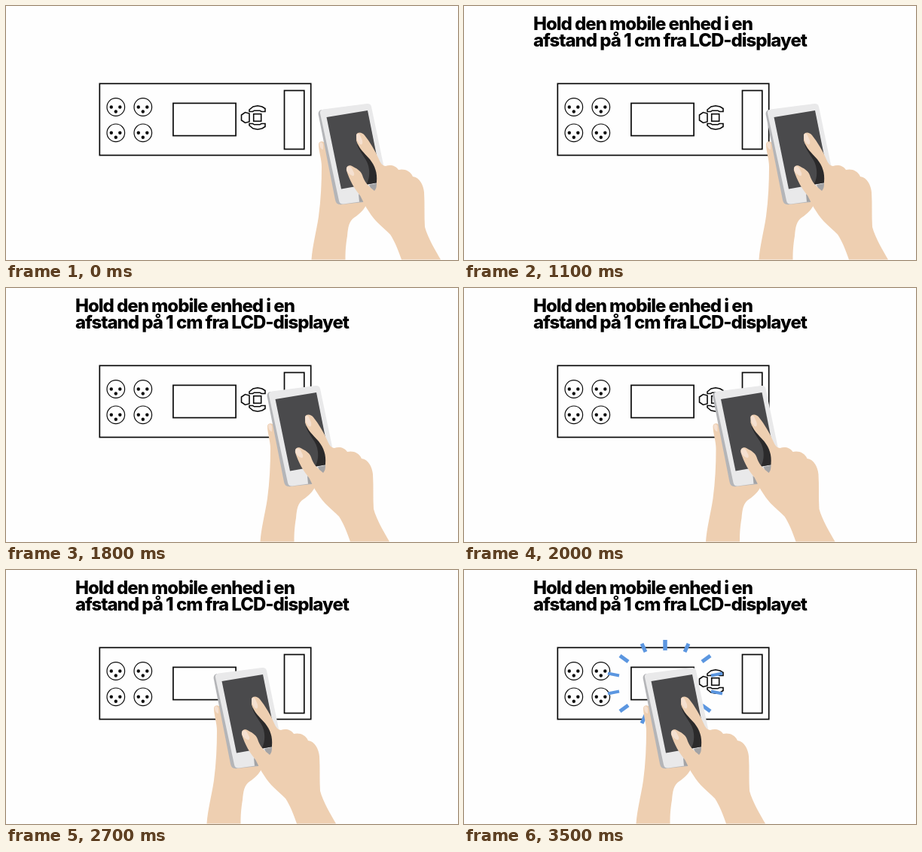
An HTML page with a canvas that plays this animation: 600x338 px, repeating every 3.6 s.

```html
<!DOCTYPE html>
<html lang="da">
<head>
<meta charset="utf-8">
<title>Hold den mobile enhed</title>
<style>
  html, body { margin: 0; width: 100%; height: 100%; overflow: hidden; background: #fefefe; }
  canvas { display: block; width: 600px; height: 338px; }
</style>
</head>
<body>
<canvas id="stage" width="600" height="338"></canvas>
<script>
const ctx = document.getElementById('stage').getContext('2d');
const LOOP = 3600, STEP = 100;
const SKIN = '#eecfb1', NAIL = '#f5e0d0', BLUE = '#5b96e0';

// Hand travel: [ms, x offset]
const travel = [
  [1000, 0], [1100, -14], [1500, -46], [1600, -51], [1800, -68], [2200, -101],
  [2300, -108], [2700, -139], [2800, -151], [3100, -177]
];

// One quadrant of the burst: outer x, y, inner x, y, width
const rays = [
  [0, 58, 0, 44, 5], [31, 53, 26, 42, 5], [60, 37, 49, 29, 5], [76, 13.5, 61, 10.5, 4]
];

const shape = {
  backHand: new Path2D('M415 184 C415 180 420 179 423 182 C427 187 429 197 431 206 L445 255 L480 261 C476 271 469 277 463 281 C455 286 454 295 453 306 C451 318 450.5 327 450.5 337.5 L405.5 337.5 C407 318 412 300 415 280 C418 257 419 235 419 214 C419 204 415 193 415 184Z'),
  backNail: new Path2D('M416 183 C417 180 420 181 421 184 L421 191 C418 191 416 187 416 183Z'),
  side: new Path2D('M419 138 C415 139 414 142 415 146 L437 258 C438 263 441 265 446 264 L474 261 L460 180Z'),
  body: new Path2D('M421 137.5 L479 130 Q484 129.500 485 134 L508 245 Q509 254 502 256 L448 263.500 Q443 264 442 259 L417 143 Q416 138.500 421 137.500Z'),
  screen: new Path2D('M425.5 148 L480 139 L499 234 L445 243.5Z'),
  shadow: new Path2D('M466 184 C470 197 481 204 482 218 C483 229 480 234 478 239 L498 240 L500 212 L480 188Z'),
  underThumb: new Path2D('M482 238 L494 235.500 L495 250 L487 249Z'),
  baseShade: new Path2D('M468 250 L476 257 L475 260.500 L469 260.800Z'),
  frontHand: new Path2D('M465 171 C467 167 473 168 476 172 C483 181 490 192 495 204 C497 209 500 213 504 213 C510 211 517 212 521 218 C528 216 537 219 540 227 C549 228 554 238 555 248 C556 264 555 279 556 294 C560 309 570 325 577 337.5 L525 337.5 C521 326 516 313 510 304 C500 294 489 286 482 274 C477 267 474 260 470 252 C463 244 456 232 452 219 C451 213 456 210 461 214 C467 217 472 220 474 228 C477 236 483 241 489 246 C492 243 492 239 492 234 C493 222 490 213 483 204 C475 195 468 189 465 179Z'),
  indexNail: new Path2D('M465 172 C466 169 469 169 470 172 L473 179 C474 184 472 186 469 183 C466 180 465 176 465 172Z'),
  thumbNail: new Path2D('M452 216 C453 212 457 213 459 216 L462 222 C463 226 461 227 458 225 C454 223 452 220 452 216Z')
};

function fill(path, color) {
  ctx.fillStyle = color;
  ctx.fill(path);
}

function dot(x, y, r) {
  ctx.beginPath();
  ctx.arc(x, y, r, 0, Math.PI * 2);
}

function polygon(points) {
  ctx.beginPath();
  points.forEach(([x, y]) => ctx.lineTo(x, y));
  ctx.closePath();
  ctx.stroke();
}

function handOffset(ms) {
  if (ms <= travel[0][0]) return 0;
  for (let i = 1; i < travel.length; i++) {
    const [t0, x0] = travel[i - 1], [t1, x1] = travel[i];
    if (ms <= t1) return x0 + (x1 - x0) * (ms - t0) / (t1 - t0);
  }
  return travel[travel.length - 1][1];
}

function drawSocket(x, y) {
  ctx.lineWidth = 1.2;
  dot(x, y, 11.8);
  ctx.stroke();
  for (const [dx, dy] of [[-6, 0], [5.5, 0], [0, 6]]) {
    dot(x + dx, y + dy, 2.2);
    ctx.fill();
  }
}

function drawPad() {
  ctx.lineWidth = 1.6;
  ctx.strokeRect(328.7, 143.7, 10, 9.6);
  polygon([[312.5, 145], [317.5, 141.5], [323, 143], [323, 154], [317.5, 155.5], [312.5, 152]]);
  const arch = [[323, 138], [328, 134], [334, 132.8], [340, 134], [344, 136.5],
    [344, 140.5], [339, 140.5], [337, 139.2], [329.5, 139.2], [327.5, 140.5], [323, 140.5]];
  polygon(arch);
  polygon(arch.map(([x, y]) => [x, 297 - y]));
}

function drawDevice() {
  ctx.strokeStyle = ctx.fillStyle = '#0a0a0a';
  ctx.lineWidth = 1.7;
  ctx.strokeRect(124.3, 103.3, 280.4, 95.3);
  ctx.strokeRect(221.9, 129.4, 83.2, 43.2);
  ctx.strokeRect(369.5, 112.5, 26.3, 78);
  for (const x of [145.8, 181.8])
    for (const y of [134.5, 168.8]) drawSocket(x, y);
  drawPad();
}

function drawBurst(grow) {
  ctx.strokeStyle = BLUE;
  for (const [ox, oy, ix, iy, w] of rays) {
    ctx.lineWidth = w;
    for (const sx of [-1, 1])
      for (const sy of [-1, 1]) {
        ctx.beginPath();
        ctx.moveTo(267 + sx * ix, 151 + sy * iy);
        ctx.lineTo(267 + sx * (ix + (ox - ix) * grow), 151 + sy * (iy + (oy - iy) * grow));
        ctx.stroke();
      }
  }
}

function drawHands(dx) {
  ctx.save();
  ctx.translate(dx, 0);
  fill(shape.backHand, SKIN);
  fill(shape.backNail, NAIL);
  fill(shape.side, '#b4b5b8');
  fill(shape.body, '#e9e9ea');
  fill(shape.underThumb, '#a3a3a5');
  fill(shape.baseShade, '#a3a3a5');
  fill(shape.screen, '#4a4a4c');
  ctx.save();
  ctx.clip(shape.screen);
  fill(shape.shadow, '#2b2a2b');
  ctx.restore();
  fill(shape.frontHand, SKIN);
  fill(shape.indexNail, NAIL);
  fill(shape.thumbNail, NAIL);
  ctx.restore();
}

function drawTitle(alpha) {
  ctx.globalAlpha = alpha;
  ctx.fillStyle = '#000';
  ctx.font = '800 24px Inter, sans-serif';
  ctx.letterSpacing = '-1.03px';
  ctx.fillText('Hold den mobile enhed i en', 92, 31.5);
  ctx.fillText('afstand på 1 cm fra LCD-displayet', 92, 53.5);
  ctx.globalAlpha = 1;
}

function draw() {
  const ms = Math.floor(performance.now() % LOOP / STEP) * STEP;
  ctx.fillStyle = '#fefefe';
  ctx.fillRect(0, 0, 600, 338);
  drawDevice();
  if (ms >= 3400) drawBurst(ms >= 3500 ? 1 : 0.5);
  drawHands(handOffset(ms));
  drawTitle(Math.min(1, ms / 300));
  requestAnimationFrame(draw);
}
draw();
</script>
</body>
</html>
```
